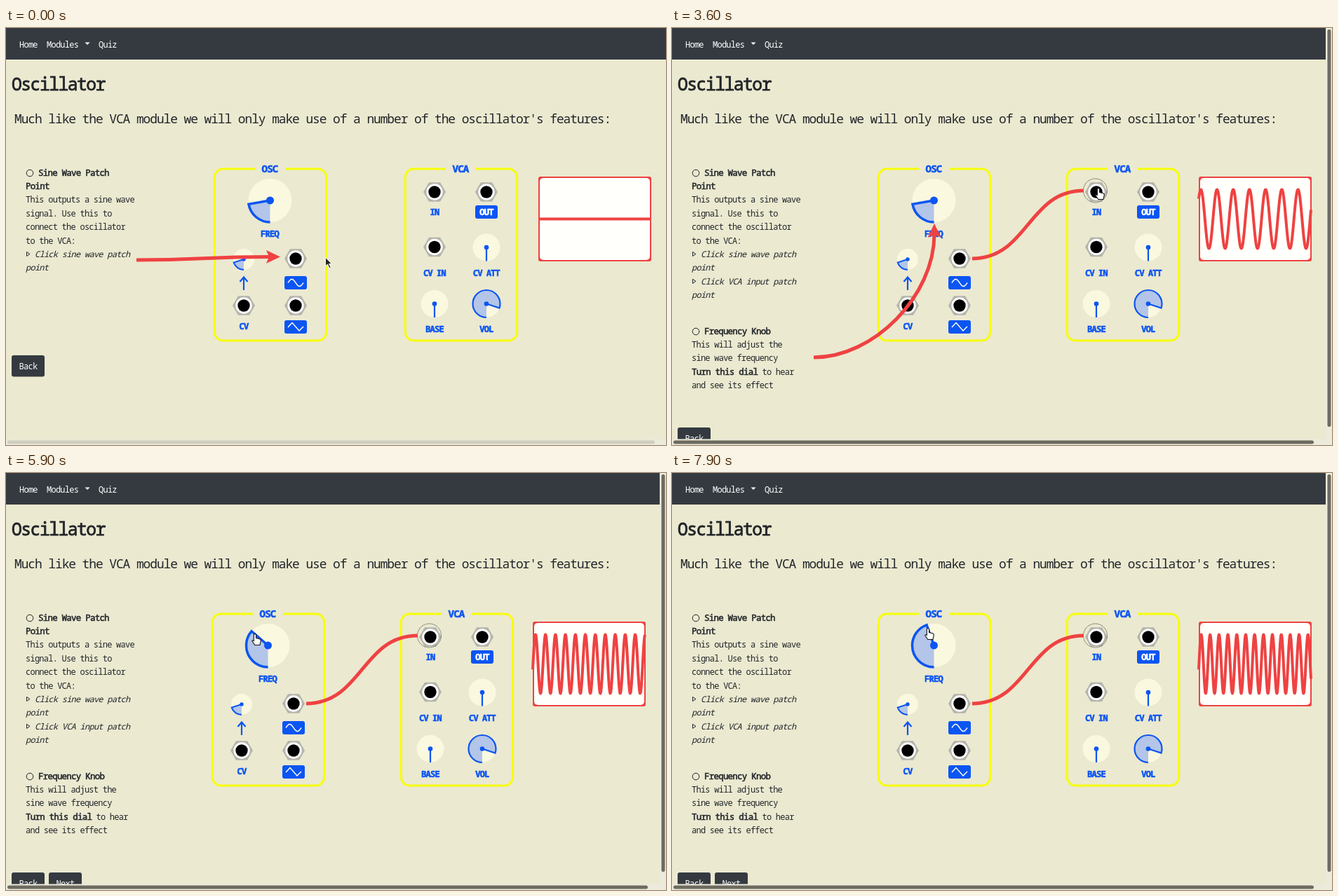
Animation of 941x595 px, one loop 8 s. Source, as an HTML page with a canvas:

```html
<!DOCTYPE html>
<html lang="en">
<head>
<meta charset="utf-8">
<title>Oscillator</title>
<style>
  html, body { margin: 0; width: 100%; height: 100%; overflow: hidden; background: #ebe9d0; }
  canvas { display: block; }
</style>
</head>
<body>
<canvas id="stage" width="941" height="595"></canvas>
<script>
const ctx = document.getElementById('stage').getContext('2d');
const LOOP = 8000, STEP = 100;
const BG = '#ebe9d0', DARK = '#343a40', INK = '#212529', BLUE = '#0b55f2',
      RED = '#ef4242', CREAM = '#fbf8e0', YELLOW = '#f8fd08', THUMB = '#6d6a60';

// Moments of the story, in ms.
const CLICK_SINE = 1400, SHOW_INPUT = 1600, PATCHED = 3200, SIGNAL = 3300, GRAB = 5200, TURNED = 5500;

// Columns inside a module, from its left edge.
const LEFT = 42, RIGHT = 116;

const ease = u => { u = Math.min(1, Math.max(0, u)); return u * u * (3 - 2 * u); };
const progress = (t, start, end) => ease((t - start) / (end - start));

const dialSweep = t => 80 + 182 * progress(t, TURNED, 6650) - 104 * progress(t, 6900, 8000);
const waveCycles = sweep => 15 - 8.07 * Math.exp((80 - sweep) / 66);

// Each stroke of the mouse: start, end, x, y on arrival.
const MOVES = [
  [0, 300, 469, 327], [400, 600, 440, 326], [600, 1200, 411, 326],
  [1900, 2400, 608, 229], [4100, 4500, 645, 338], [4500, GRAB, 358, 249]
];

function cursorAt(t) {
  if (t > GRAB) {
    const angle = (90 + dialSweep(t)) * Math.PI / 180;
    const reach = 15.5 + 10 * progress(t, TURNED, 6000);
    return [373.5 + reach * Math.cos(angle), 246 + reach * Math.sin(angle)];
  }
  return MOVES.reduce(([x, y], [start, end, toX, toY]) => {
    const u = progress(t, start, end);
    return [x + (toX - x) * u, y + (toY - y) * u];
  }, [455.5, 327]);
}

function text(str, x, y, advance, { color = INK, weight = 400, heft = 0, style = '', center = false } = {}) {
  const size = advance * 1.85;
  ctx.font = `${style} ${weight} ${size}px "Noto Sans Mono", "DejaVu Sans Mono", monospace`;
  ctx.letterSpacing = `${advance - size * 0.6}px`;
  ctx.fillStyle = ctx.strokeStyle = color;
  const left = center ? x - str.length * advance / 2 : x;
  ctx.fillText(str, left, y);
  if (!heft) return;
  ctx.lineWidth = heft;
  ctx.strokeText(str, left, y);
}

function box(x, y, w, h, r, color) {
  ctx.fillStyle = color;
  ctx.beginPath();
  ctx.roundRect(x, y, w, h, r);
  ctx.fill();
}

function disc(x, y, r, color) {
  ctx.fillStyle = color;
  ctx.beginPath();
  ctx.arc(x, y, r, 0, 7);
  ctx.fill();
}

function ring(x, y, r, color, width, dash = []) {
  ctx.strokeStyle = color;
  ctx.lineWidth = width;
  ctx.setLineDash(dash);
  ctx.beginPath();
  ctx.arc(x, y, r, 0, 7);
  ctx.stroke();
  ctx.setLineDash([]);
}

function trace(points) {
  ctx.beginPath();
  points.forEach(([x, y]) => ctx.lineTo(x, y));
}

function line(points, color, width) {
  trace(points);
  ctx.strokeStyle = color;
  ctx.lineWidth = width;
  ctx.stroke();
}

function shape(points, color) {
  trace(points);
  ctx.fillStyle = color;
  ctx.fill();
}

function plot(x, length, step, heightAt, color, width) {
  const points = [];
  for (let i = 0; i <= length; i += step) points.push([x + i, heightAt(i)]);
  ctx.lineJoin = 'round';
  line(points, color, width);
  ctx.lineJoin = 'miter';
}

// Leaves sideways and arrives sideways, or from below when `rising`.
function cable(x1, y1, x2, y2, rising = false) {
  const midX = (x1 + x2) / 2, midY = (y1 + y2) / 2;
  ctx.strokeStyle = RED;
  ctx.lineWidth = 5;
  ctx.beginPath();
  ctx.moveTo(x1, y1);
  ctx.bezierCurveTo(midX, y1, rising ? x2 : midX, rising ? midY : y2, x2, y2);
  ctx.stroke();
}

function arrow(x1, y1, x2, y2, rising = false) {
  cable(x1, y1, rising ? x2 : x2 - 15, rising ? y2 + 15 : y2, rising);
  ctx.save();
  ctx.translate(x2, y2);
  if (rising) ctx.rotate(-Math.PI / 2);
  shape([[0, 0], [-20, -9.5], [-16, 0], [-20, 9.5]], RED);
  ctx.restore();
}

function jack(x, y) {
  const corners = [];
  for (let a = 0; a < 6; a++) {
    corners.push([x + 16 * Math.cos(a * Math.PI / 3), y + 16 * Math.sin(a * Math.PI / 3)]);
  }
  shape(corners, '#b5b4ab');
  disc(x, y, 11.7, '#fff');
  disc(x, y, 8.7, '#000');
}

function dial(x, y, r, sweep, width = 2.2, hub = 3.3) {
  const start = Math.PI / 2, end = start + sweep * Math.PI / 180;
  disc(x, y, r, CREAM);
  ctx.beginPath();
  ctx.arc(x, y, r, start, end);
  ctx.lineTo(x, y);
  ctx.fillStyle = '#b3c5e8';
  ctx.fill();
  ctx.strokeStyle = BLUE;
  ctx.lineWidth = width;
  ctx.stroke();
  disc(x, y, hub, BLUE);
}

function label(str, x, y, advance = 6.5, color = BLUE) {
  text(str, x, y + 4.5, advance, { color, weight: 800, heft: 0.6, center: true });
}

const badge = (x, y) => box(x + RIGHT - 16, y, 32, 19, 3, BLUE);

function panel(x, title) {
  ctx.strokeStyle = YELLOW;
  ctx.lineWidth = 3;
  ctx.beginPath();
  ctx.roundRect(x + 0.3, 201, 159.4, 245, 12);
  ctx.stroke();
  box(x + 58, 196, 43, 10, 0, BG);
  label(title, x + 79, 201.5, 7.6);
}

function oscModule(x, sweep) {
  panel(x, 'OSC');
  dial(x + 79.5, 246, 31, sweep, 3.5, 5.5);
  label('FREQ', x + 79, 293);
  dial(x + LEFT, 330, 15, 72, 2, 2.7);
  line([[x + LEFT, 374], [x + LEFT, 356]], BLUE, 2.2);
  line([[x + 36.5, 362], [x + LEFT, 355.5], [x + 47.5, 362]], BLUE, 2.2);
  jack(x + RIGHT, 329);
  jack(x + LEFT, 396);
  jack(x + RIGHT, 396);
  label('CV', x + LEFT, 425);
  badge(x, 354);
  badge(x, 417);
  plot(x + 105, 22, 1, i => 363.5 - 5 * Math.sin(i / 11 * Math.PI), '#fff', 1.5);
  line([[x + 105, 427], [x + 111, 420.5], [x + 121, 432], [x + 127, 426]], '#fff', 1.5);
}

function vcaModule(x) {
  panel(x, 'VCA');
  jack(x + LEFT, 234);
  jack(x + RIGHT, 234);
  jack(x + LEFT, 312.5);
  badge(x, 253);
  dial(x + RIGHT, 313, 19.5, 0);
  dial(x + LEFT, 393.5, 19.5, 0);
  dial(x + RIGHT, 393.5, 19.5, 288);
  label('IN', x + LEFT, 262);
  label('OUT', x + RIGHT, 262, 6.5, '#fff');
  label('CV IN', x + LEFT, 349, 6.3);
  label('CV ATT', x + RIGHT, 349, 6.3);
  label('BASE', x + LEFT, 429);
  label('VOL', x + RIGHT, 429);
}

function scope(x, t, sweep) {
  box(x, 212, 161, 121, 3, RED);
  box(x + 2, 214, 157, 117, 5, '#fffffb');
  if (t < SIGNAL) return box(x, 270.5, 161, 4, 0, RED);
  const cycles = waveCycles(sweep) / 160;
  const phase = t < TURNED ? 0.13 + 0.00095 * (t - 3600) : 0.28;
  plot(x, 160, 0.5, i => 272.5 - 42 * Math.cos((i * cycles - phase) * 2 * Math.PI), RED, 4);
}

const rowY = row => 210.5 + row * 19.42;
const note = (str, row, x = 28, style = '') => text(str, x, rowY(row), 6.46, { style });
const strong = (str, row, x = 28) => text(str, x, rowY(row), 6.73, { heft: 0.55 });

function topic(str, row) {
  ring(34, rowY(row) - 3.5, 4.8, INK, 1);
  strong(str, row, 46);
}

function hint(str, row) {
  const y = rowY(row) - 4.5;
  line([[29.5, y - 3], [34, y], [29.5, y + 3], [29.5, y - 3]], INK, 1);
  note(str, row, 41, 'italic');
  note('point', row + 1, 28, 'italic');
}

function instructions(t) {
  topic('Sine Wave Patch', 0);
  strong('Point', 1);
  ['This outputs a sine wave', 'signal. Use this to', 'connect the oscillator', 'to the VCA:']
    .forEach((str, i) => note(str, i + 2));
  hint('Click sine wave patch', 6);
  if (t >= SHOW_INPUT) hint('Click VCA input patch', 8);
  if (t < PATCHED) return;
  const row = 11.64;
  topic('Frequency Knob', row);
  note('This will adjust the', row + 1);
  note('sine wave frequency', row + 2);
  strong('Turn this dial', row + 3);
  note('to hear', row + 3, 128.5);
  note('and see its effect', row + 4);
}

function button(str, x, y) {
  box(x, y, 47, 30.5, 3, DARK);
  text(str, x + 23.5, y + 20, 6.5, { color: '#fff', center: true });
}

function header(width) {
  box(0, 0, width, 45, 0, DARK);
  const white = { color: '#fff' };
  text('Home', 19, 27.5, 6.46, white);
  text('Modules', 58, 27.5, 6.46, white);
  text('Quiz', 132, 27.5, 6.46, white);
  shape([[112.5, 20.5], [119.5, 20.5], [116, 24]], '#fff');
  text('Oscillator', 8, 88.5, 13.3, { heft: 0.8 });
  text("Much like the VCA module we will only make use of a number of the oscillator's features:",
    12, 135.5, 9.67);
}

function scrollbars(t, patched) {
  box(0, 586.5, 941, 8.5, 0, '#eceada');
  box(2, 588.5, patched ? 913 : 923, 5, 2.5, t < CLICK_SINE ? '#d0cebf' : THUMB);
  if (!patched) return;
  box(932, 0, 9, 595, 0, '#eceada');
  box(934.5, 2, 5, 567, 2.5, THUMB);
}

function guides(t) {
  if (t < SHOW_INPUT) arrow(186, 331, 391, 326.5);
  else if (t < PATCHED) arrow(186, 370, 587, 232);
  else {
    cable(428, 329, 587, 232);
    if (t < TURNED) arrow(202, 470, 374, 279, true);
  }
}

function focusRing(t, patched) {
  if (patched) ring(603.5, 232, 17, '#222', 1, [1, 1]);
  else if (t >= CLICK_SINE) ring(413, 329, 18, RED, 2.2);
}

const HAND = new Path2D('M-1.6 8V1.2a1.6 1.6 0 0 1 3.2 0V5.5l5 1.2q2 .5 1.7 3L7 15.5H-.2L-4 10q-.4-2.2 2.4-.6z');
const POINTER = new Path2D('M0 0V13L3 10.4 5.6 16 7.8 15 5.3 9.7 9 9.4z');

function cursor(t, clickable) {
  const [x, y] = cursorAt(t);
  const hand = clickable.some(([cx, cy, r]) => Math.hypot(x - cx, y - cy) < r);
  const outline = hand ? HAND : POINTER;
  ctx.save();
  ctx.translate(x, y);
  ctx.lineWidth = 1.1;
  ctx.strokeStyle = hand ? '#111' : '#f4f3e8';
  ctx.fillStyle = hand ? '#fff' : '#222';
  ctx.fill(outline);
  ctx.stroke(outline);
  ctx.restore();
}

function draw(t) {
  const patched = t >= PATCHED, sweep = dialSweep(t);
  const oscX = patched ? 294 : 297, vcaX = patched ? 563 : 569;
  box(0, 0, 941, 595, 0, BG);
  header(patched ? 932 : 941);
  instructions(t);
  button('Back', 8, patched ? 570 : 467);
  if (t >= TURNED) button('Next', 61, 570);
  oscModule(oscX, sweep);
  vcaModule(vcaX);
  scope(patched ? 751 : 759, t, sweep);
  focusRing(t, patched);
  guides(t);
  scrollbars(t, patched);
  cursor(t, [[oscX + RIGHT, 329, 16], [vcaX + LEFT, 234, 16], [oscX + 79.5, 246, 31]]);
}

function frame() {
  draw(Math.floor(performance.now() % LOOP / STEP) * STEP);
  requestAnimationFrame(frame);
}
frame();
</script>
</body>
</html>
```
